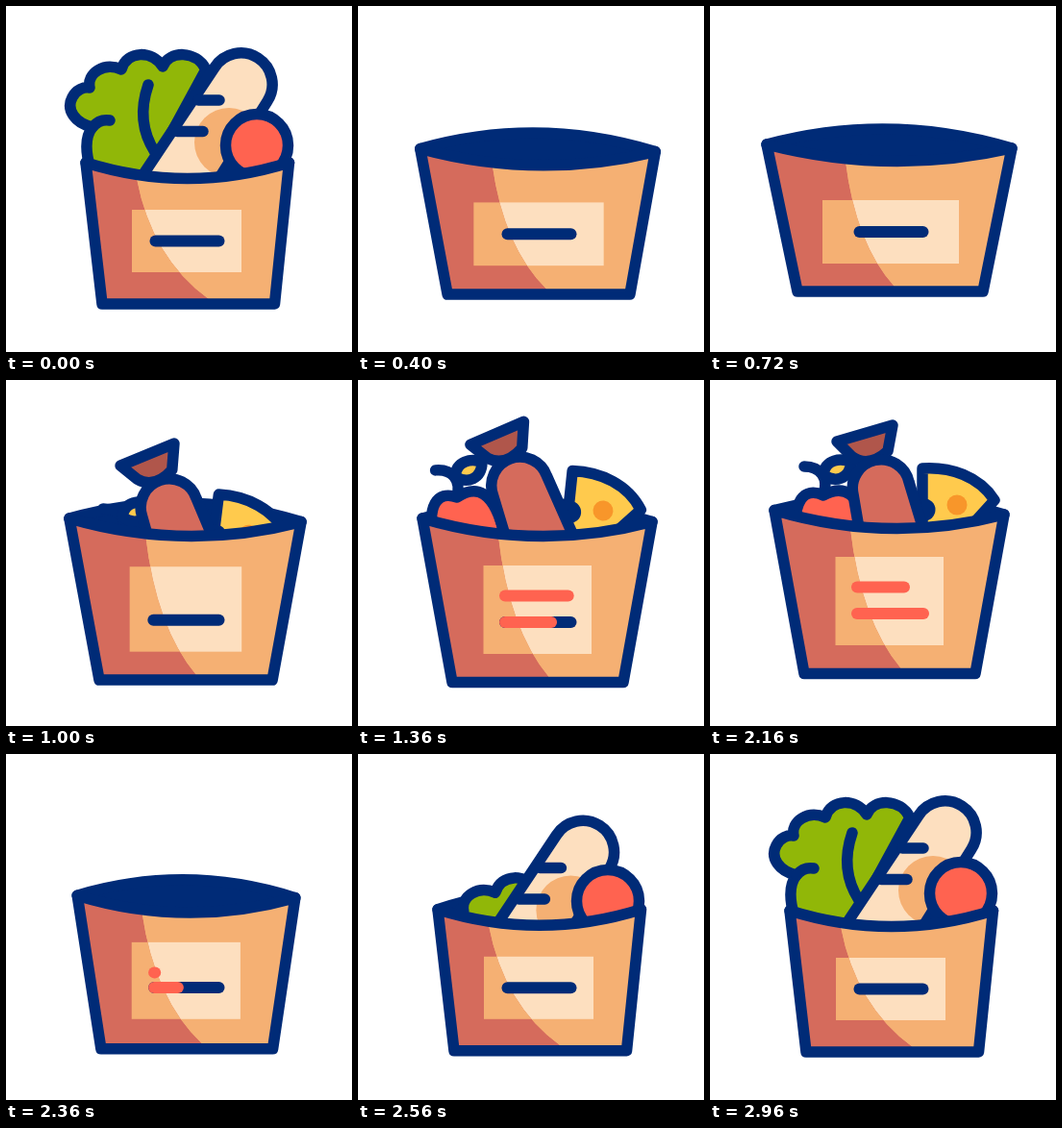
An HTML page with a canvas for the animation above (3000 ms loop, 360 px wide and 360 px high).

```html
<!DOCTYPE html>
<html lang="en">
<head>
<meta charset="utf-8">
<title>Grocery bag</title>
<style>
  html, body { margin: 0; width: 100%; height: 100%; overflow: hidden; background: #fff; }
  canvas { display: block; width: 360px; height: 360px; }
</style>
</head>
<body>
<canvas id="stage"></canvas>
<script>
const LOOP = 3000;
const NAVY = '#002b77', RED = '#ff6350', ROSE = '#d56b5c', BROWN = '#b0564b';
const TAN = '#f5b073', CREAM = '#fddfbf', GREEN = '#91b708', YELLOW = '#ffca4d', AMBER = '#f8962a';

const canvas = document.getElementById('stage');
const ctx = canvas.getContext('2d');
const ratio = window.devicePixelRatio || 1;
canvas.width = canvas.height = 360 * ratio;

// Bag poses: rim ends, base, rim middles, shade edge, label box
const narrow = { dy: 0, xl: 83, yl: 163, xr: 294.5, yr: 163, bl: 100, br: 279.5, by: 310,
  front: 179.5, back: 145, st: 136, sb: 211, lx: 131, ly: 212, lw: 114, lh: 65, line: 32.5, x0: 155.5 };
const squat = { dy: 0, xl: 59, yl: 144, xr: 314, yr: 148, bl: 91, br: 284, by: 297,
  front: 161.5, back: 128, st: 141, sb: 192, lx: 117, ly: 202, lw: 142, lh: 66, line: 33, x0: 155.5 };
const wide = { dy: 0, xl: 67, yl: 135.5, xr: 306, yr: 140, bl: 98, br: 276, by: 305.5,
  front: 154.5, back: 120.5, st: 146, sb: 199, lx: 130.5, ly: 184, lw: 112.5, lh: 92, line: 59, x0: 153 };
const low = { ...wide, dy: 9, yl: 135, yr: 138.5, front: 153.5, back: 119 };

const bagTrack = [
  [0, narrow], [60, narrow], [560, squat], [740, squat], [1080, low], [1400, low],
  [1760, { ...wide, dy: 1.5 }], [2160, wide], [2240, wide],
  [2500, { ...narrow, dy: -1.5 }], [2560, { ...narrow, dy: -1.2 }], [2800, narrow], [LOOP, narrow]
];

const rest = { x: 0, y: 0, r: 0 };
const place = (x, y, r = 0) => ({ x, y, r });

// Produce: out at the loop ends, inside the bag in between
const freshTrack = (down0, down1, hidden, up0, up1) =>
  [[0, rest], [down0, rest], [down1, hidden], [up0, hidden], [up1, rest], [LOOP, rest]];
// Pantry: pops up leaning, settles, drops back
const pantryTrack = (up0, up1, hidden, lean, down1) =>
  [[0, hidden], [up0, hidden], [up1, lean], [1400, lean], [1760, place(0, -2, lean.r * .08)],
   [2160, rest], [2210, rest], [down1, hidden], [LOOP, hidden]];

const bar1Track = [[0, { v: 153 }], [1040, { v: 153 }], [1410, { v: 222 }], [1760, { v: 222 }],
  [2100, { v: 202 }], [2230, { v: 202 }], [2380, { v: 153 }], [LOOP, { v: 153 }]];
const bar2Track = [[0, { v: 153 }], [1120, { v: 153 }], [1500, { v: 222 }],
  [2250, { v: 222 }], [2440, { v: 153 }], [LOOP, { v: 153 }]];

function sample(track, t) {
  let i = 1;
  while (i < track.length - 1 && t > track[i][0]) i++;
  const [t0, a] = track[i - 1], [t1, b] = track[i];
  const u = Math.min(1, Math.max(0, (t - t0) / (t1 - t0)));
  const k = u * u * (3 - 2 * u);
  const out = {};
  for (const key in a) out[key] = a[key] + (b[key] - a[key]) * k;
  return out;
}

function shape(d, fill, line = true) {
  const p = d instanceof Path2D ? d : new Path2D(d);
  if (fill) { ctx.fillStyle = fill; ctx.fill(p); }
  if (line) { ctx.strokeStyle = NAVY; ctx.stroke(p); }
}

function disc(x, y, r, fill, line = false) {
  const p = new Path2D();
  p.arc(x, y, r, 0, Math.PI * 2);
  shape(p, fill, line);
}

function bar(x0, x1, y, color) {
  ctx.strokeStyle = color;
  ctx.beginPath();
  ctx.moveTo(x0, y);
  ctx.lineTo(x1, y);
  ctx.stroke();
}

function lettuce() {
  shape('M88 170C82 150 82 136 90 126C72 122 62 108 69 95C73 87 81 84 87 85' +
    'C84 70 102 58 120 66C126 46 152 46 163 63C170 46 198 46 208 66L146 180Z', GREEN);
  shape('M90 126C95 120 102 118 108 119M148 82C139 108 142 132 155 152');
}

function baguette() {
  const loaf = new Path2D('M137 184L217 64A32 32 0 0 1 272 99L215 190Z');
  shape(loaf, CREAM, false);
  ctx.save();
  ctx.clip(loaf);
  disc(232, 142, 36, TAN);
  ctx.restore();
  shape(loaf);
  bar(200, 222, 98, NAVY);
  bar(178, 205, 130.5, NAVY);
}

function tomato() {
  disc(261, 145, 32.5, RED, true);
}

function apple() {
  shape('M90 160C86 128 97 110 118 120C138 109 157 114 164 165Z', RED);
  shape('M118 119C124 102 115 90 98 90');
  shape('M118 98C120 83 136 80 147 86C145 103 130 108 118 98Z', YELLOW);
}

function sausage() {
  shape('M132 64L190 47L185 74Q165 92 148 80Z', BROWN);
  shape('M158 172L149 119A29.5 29.5 0 0 1 207 106L227 172Z', ROSE);
}

function cheese() {
  shape('M221 92C250 90 280 100 296 125L266 158H221Z', YELLOW);
  disc(257, 130, 10.5, AMBER);
  disc(223, 135, 11.5, NAVY);
}

const items = [
  { draw: cheese, px: 257, py: 130,
    track: pantryTrack(800, 1100, place(-12, 105, 10), place(-2, 6, 6), 2400) },
  { draw: apple, px: 118, py: 130,
    track: pantryTrack(840, 1120, place(30, 110, 8), place(-14, 2, -5), 2390) },
  { draw: sausage, px: 200, py: 200,
    track: pantryTrack(750, 1080, place(0, 155, 0), place(1, -6, -7), 2420) },
  { draw: lettuce, px: 150, py: 120, track: freshTrack(20, 420, place(46, 158), 2400, 2720) },
  { draw: baguette, px: 200, py: 120, track: freshTrack(60, 480, place(-70, 135), 2380, 2620) },
  { draw: tomato, px: 261, py: 145, track: freshTrack(40, 400, place(-10, 80), 2360, 2610) }
];

function drawItem(item, t) {
  const p = sample(item.track, t);
  ctx.save();
  ctx.translate(item.px + p.x, item.py + p.y);
  ctx.rotate(p.r * Math.PI / 180);
  ctx.translate(-item.px, -item.py);
  item.draw();
  ctx.restore();
}

function drawFront(b, body) {
  const label = color => { ctx.fillStyle = color; ctx.fillRect(b.lx, b.ly, b.lw, b.lh); };
  ctx.save();
  ctx.clip(body);
  shape(body, TAN, false);
  label(CREAM);
  const top = b.front, end = b.by - 5;
  const shade = new Path2D(`M0 0H${b.st}V${top}Q${b.st + (b.sb - b.st) * .21} ${top + (end - top) * .66} ` +
    `${b.sb} ${end}V360H0Z`);
  ctx.clip(shade);
  shape(shade, ROSE, false);
  label(TAN);
  ctx.restore();
  shape(body);
}

function draw(t) {
  const b = sample(bagTrack, t);
  const mid = (b.xl + b.xr) / 2, ends = (b.yl + b.yr) / 2;
  const frontCtl = `${mid} ${2 * b.front - ends}`, backCtl = `${mid} ${2 * b.back - ends}`;
  const left = `${b.xl} ${b.yl}`, right = `${b.xr} ${b.yr}`;

  ctx.setTransform(ratio, 0, 0, ratio, 0, 0);
  ctx.fillStyle = '#fff';
  ctx.fillRect(0, 0, 360, 360);
  ctx.lineWidth = 11.5;
  ctx.lineCap = ctx.lineJoin = 'round';
  ctx.translate(0, b.dy);

  shape(`M${left}Q${backCtl} ${right}Q${frontCtl} ${left}Z`, NAVY);

  ctx.save();
  ctx.clip(new Path2D(`M0 -20H360V${b.yr}L${right}Q${frontCtl} ${left}H0Z`));
  ctx.translate(0, -b.dy);
  for (const item of items) drawItem(item, t);
  ctx.restore();

  drawFront(b, new Path2D(`M${left}Q${frontCtl} ${right}L${b.br} ${b.by}H${b.bl}Z`));

  const end1 = sample(bar1Track, t).v, end2 = sample(bar2Track, t).v;
  const y = b.ly + b.line;
  ctx.lineWidth = 12;
  if (end2 < 221.5) bar(b.x0, 221.5, y, NAVY);
  if (end2 > 153.5) bar(b.x0, end2, y, RED);
  if (end1 > 153.5) bar(b.x0, end1, b.ly + 31.5, RED);
}

function tick() {
  draw(performance.now() % LOOP);
  requestAnimationFrame(tick);
}
tick();
</script>
</body>
</html>
```
